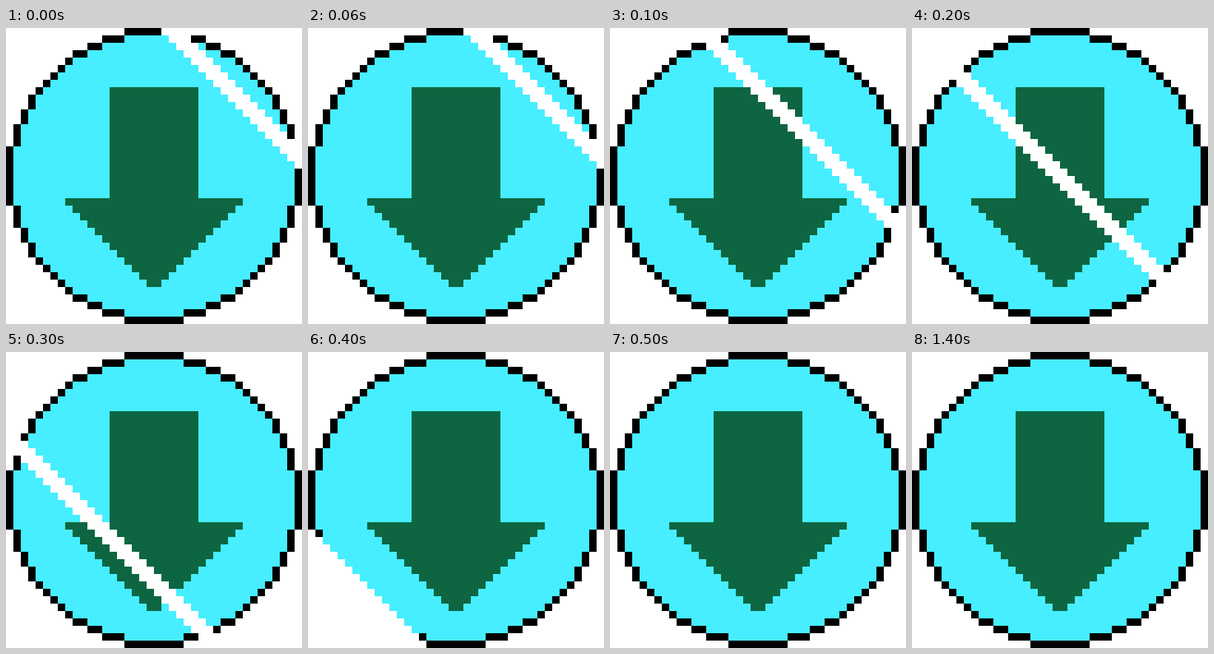
An HTML page with a canvas that plays this animation: 400 px wide and 400 px high, repeating every 2000 ms.

```html
<!DOCTYPE html>
<html lang="en">
<head>
<meta charset="utf-8">
<title>Glinting download badge</title>
<style>
html, body { margin: 0; width: 100%; height: 100%; overflow: hidden; background: #fff; }
canvas { display: block; width: 100vw; height: 100vh; image-rendering: pixelated; }
</style>
</head>
<body>
<canvas id="stage" width="400" height="400"></canvas>
<script>
const SIZE = 40, LOOP = 2000, STEP = 100;
const CYAN = '#46eeff', GREEN = '#0d6641', BLACK = '#000', WHITE = '#fff';

// Left edge of the disc for each row of its upper half.
const INSETS = [16, 13, 11, 9, 8, 7, 6, 5, 4, 3, 3, 2, 2, 1, 1, 1, 0, 0, 0, 0];

// Glint position per step: first and last diagonal (column minus row) it covers.
const GLINTS = [[21, 23], [11, 13], [-1, 1], [-12, -10], [-27, -24]];

const ctx = document.getElementById('stage').getContext('2d');
ctx.scale(10, 10);

function row(color, y, left, right) {
  ctx.fillStyle = color;
  ctx.fillRect(left, y, right - left + 1, 1);
}

function mirroredRow(color, y, left) {
  row(color, y, left, SIZE - 1 - left);
}

function drawDisc() {
  INSETS.forEach((left, i) => {
    const outlineEnd = i ? Math.max(left, INSETS[i - 1] - 1) : SIZE / 2 - 1;
    for (const y of [i, SIZE - 1 - i]) {
      mirroredRow(BLACK, y, left);
      if (i) mirroredRow(CYAN, y, outlineEnd + 1);
    }
  });
}

function drawArrow() {
  for (let y = 8; y < 23; y++) mirroredRow(GREEN, y, 14);
  for (let y = 23; y < 35; y++) mirroredRow(GREEN, y, y - 15);
}

function drawGlint([first, last]) {
  for (let y = 0; y < SIZE; y++) row(WHITE, y, y + first, y + last);
}

let shown = -1;
function render(now) {
  const step = Math.min(Math.floor(now % LOOP / STEP), GLINTS.length);
  if (step !== shown) {
    shown = step;
    ctx.fillStyle = WHITE;
    ctx.fillRect(0, 0, SIZE, SIZE);
    drawDisc();
    drawArrow();
    if (step < GLINTS.length) drawGlint(GLINTS[step]);
  }
}

const start = performance.now();
function tick() {
  render(performance.now() - start);
  requestAnimationFrame(tick);
}
tick();
</script>
</body>
</html>
```
